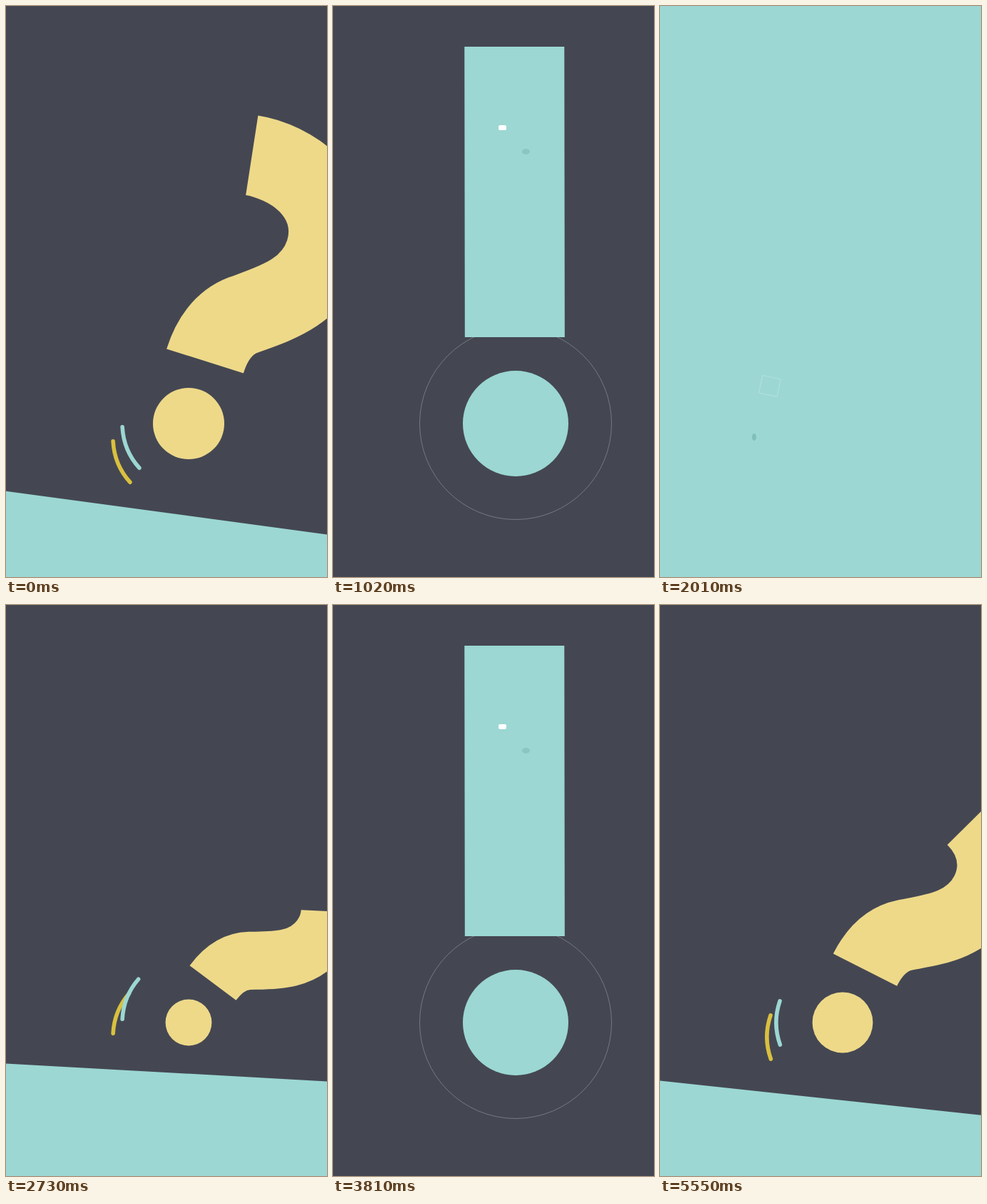
These frames come from a looping animation (450 by 800 pixels, 5580 ms). An HTML page:

```html
<!DOCTYPE html>
<html lang="en">
<head>
<meta charset="utf-8">
<title>Question to exclamation</title>
<style>
html, body { margin: 0; width: 100%; height: 100%; overflow: hidden; background: #444752; }
svg { display: block; width: 100%; height: 100%; }
</style>
</head>
<body>
<svg viewBox="0 0 450 800" fill="none">
  <rect width="450" height="800" fill="#444752"/>
  <rect id="floor" x="-600" width="1650" height="2000" fill="#9cd7d3"/>
  <circle id="ring" cx="256" cy="585" stroke="#b4b7bc"/>
  <path id="hook" stroke-width="140" stroke-linejoin="round"/>
  <circle id="dot" cx="256" cy="585"/>
  <g stroke-width="5.6" stroke-linecap="round">
    <path id="arcBack" stroke="#d9c03f" transform="translate(-13 20)"/>
    <path id="arcFront" stroke="#9cd7d3"/>
  </g>
  <g id="glint">
    <rect x="232" y="167" width="11" height="7" rx="2" fill="#fff"/>
    <ellipse cx="270.5" cy="204" rx="5.5" ry="4" fill="#8bc6c2"/>
  </g>
  <g id="trace">
    <rect x="141" y="520" width="26" height="25" rx="1" stroke="#b2e0dc" stroke-width="1.2" transform="rotate(12 154 532)"/>
    <ellipse cx="132" cy="604" rx="3" ry="5" fill="#80bfba"/>
  </g>
</svg>
<script>
const PERIOD = 2790, HOLD_END = 2250, STEP = 30;
const CX = 256, CY = 585, ARC_R = 93;
const YELLOW = [238, 217, 137], TEAL = [156, 215, 211];
const HOOK = [
  [-5, -112], [-5, -150], [5, -185], [34, -208],
  [75, -240], [138, -280], [138, -355],
  [138, -430], [75, -479], [-10, -479],
  [-60, -479], [-110, -455], [-135, -420]
];
const part = {};
document.querySelectorAll('[id]').forEach(el => part[el.id] = el);

const clamp = (v, lo = 0, hi = 1) => Math.min(hi, Math.max(lo, v));
const mix = (a, b, p) => a + (b - a) * p;
const smooth = p => p * p * (3 - 2 * p);
const ramp = (t, from, to) => smooth(clamp((t - from) / (to - from)));
const set = (el, attrs) => { for (const k in attrs) el.setAttribute(k, attrs[k]); };
const show = (el, on) => el.setAttribute('visibility', on ? 'visible' : 'hidden');

// Smooth interpolation between [time, value] keys
function track(t, keys) {
  if (t <= keys[0][0]) return keys[0][1];
  for (let i = 1; i < keys.length; i++) {
    const [t0, v0] = keys[i - 1], [t1, v1] = keys[i];
    if (t < t1) return mix(v0, v1, ramp(t, t0, t1));
  }
  return keys[keys.length - 1][1];
}

function drawFloor(t) {
  let mid, tilt;
  if (t < -60) {
    const p = clamp((t + 540) / 480), pull = p ** 3 - p ** 2;
    mid = 655 * smooth(p) + 720 * pull;
    tilt = 3.2 * smooth(p) + 59 * pull;
  } else {
    const rest = clamp((69 - t) / 129) ** 3, leave = ramp(t, 69, 360);
    mid = 720 - 65 * rest + 150 * leave;
    tilt = (8.5 - 5.3 * rest) * (1 - leave);
  }
  if (t <= -540) mid = -10;
  set(part.floor, { y: mid, transform: `rotate(${tilt} 225 ${mid})` });
}

function drawHook(t, color) {
  const scale = 1 - 0.193 * Math.exp(-t / 77);
  const length = t < 0 ? 536 + 2.87 * t : 536 + 104 * (1 - Math.exp(-t / 36));
  show(part.hook, scale > 0.02 && length > 0);
  if (scale <= 0.02) return;

  const swing = Math.exp(-t / 180) * (17.5 * Math.cos(0.009 * t) - 22 * Math.sin(0.009 * t));
  const whip = track(t, [[570, 0], [690, -22], [810, 20], [900, -5], [975, 0]]);
  const straight = ramp(t, 660, 810);
  const stretch = track(t, [[690, 1], [810, 1.2], [900, 0.97], [975, 1]]);
  const points = HOOK.map(([x, y], i) => [
    mix(x, -1, straight),
    mix(y, -121 - 407 * stretch * i / 12, straight)
  ]);
  const shift = -Math.max(0, swing - 15) / 7;
  set(part.hook, {
    d: `M${points[0]}C${points.slice(1).join(' ')}`,
    transform: `translate(${CX} ${CY}) rotate(${swing + whip}) translate(${shift} 0) scale(${scale})`,
    'stroke-dasharray': t < 300 ? `${Math.max(0, length)} 3000` : 'none',
    stroke: color
  });
}

function drawDot(t, color) {
  const grown = 74 * Math.max(0, 1 - 0.324 * Math.exp(-t / 109));
  const flood = 590 * clamp((t - 1640) / 340) ** 2;
  set(part.dot, { r: grown + flood, fill: color });
}

function drawRing(t) {
  const r = 164 - 29.5 * Math.exp((1020 - t) / 146);
  show(part.ring, t >= 840 && t < 1710);
  set(part.ring, {
    r: Math.max(0, r),
    'stroke-width': 0.8 + 14 * (1 - ramp(t, 840, 1000)),
    opacity: 0.55 * (1 - ramp(t, 1140, 1710))
  });
}

function drawArcs(t) {
  const head = clamp(138 - 0.75 * t, 60, 245);
  const tail = clamp(177 - 0.73 * t, 60, 245);
  const at = deg => {
    const a = deg * Math.PI / 180;
    return [CX + ARC_R * Math.cos(a), CY + ARC_R * Math.sin(a)];
  };
  const d = `M${at(tail)}A${ARC_R} ${ARC_R} 0 0 0 ${at(head)}`;
  for (const arc of [part.arcBack, part.arcFront]) {
    show(arc, tail - head > 1);
    arc.setAttribute('d', d);
  }
}

function render(ms) {
  const local = Math.floor((ms % PERIOD) / STEP) * STEP;
  // Times below zero lead up to the loop point
  const t = local >= HOLD_END ? local - PERIOD : local;
  const tint = ramp(t, 690, 810);
  const color = `rgb(${YELLOW.map((v, i) => Math.round(mix(v, TEAL[i], tint)))})`;
  drawFloor(t);
  drawRing(t);
  drawHook(t, color);
  drawDot(t, color);
  drawArcs(t);
  show(part.glint, t >= 990 && t < 1650);
  show(part.trace, t >= 1980);
}

const start = performance.now();
function tick() {
  render(performance.now() - start);
  requestAnimationFrame(tick);
}
tick();
</script>
</body>
</html>
```
